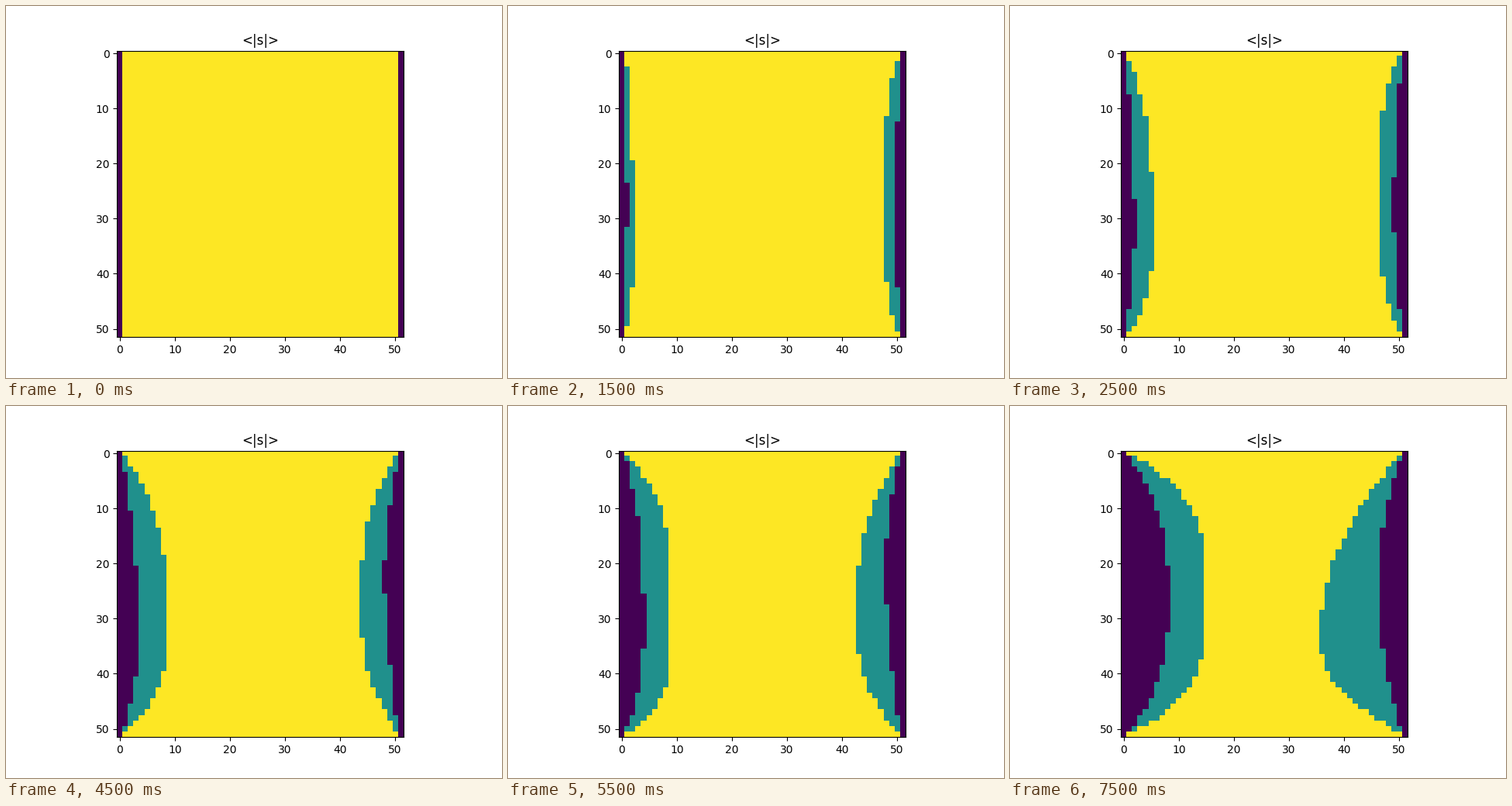
A matplotlib script for the animation above (8000 ms loop, 640x480 px).

```python
import matplotlib.pyplot as plt
import numpy as np
from matplotlib.animation import FuncAnimation

SIZE = 52
LAST = SIZE - 1
DARK, MIXED, BRIGHT = 0, 1, 2
rows = np.arange(SIZE)
cols = np.arange(SIZE)


def depth(peak, reach, fullness):
    """Whole cells covered from a wall: an arch pinned at both corners."""
    t = np.where(rows < peak, rows / peak, (LAST - rows) / (LAST - peak))
    return 1 + np.round(reach * (1 - (1 - t) ** fullness))


def fronts(left_dark, left_mixed, right_dark, right_mixed):
    """One (peak row, reach, fullness) arch per front."""
    return np.array([left_dark, left_mixed, right_dark, right_mixed])


def between(a, b):
    return (a + b) / 2


def grid(arches):
    depths = np.array([depth(*arch) for arch in arches])
    left_dark, left_mixed, right_dark, right_mixed = depths[:, :, None]
    from_right = LAST - cols
    cells = np.full((SIZE, SIZE), BRIGHT)
    cells[(cols < left_mixed) | (from_right < right_mixed)] = MIXED
    cells[(cols < left_dark) | (from_right < right_dark)] = DARK
    return cells


thin = fronts((28, 0.515, 2), (36, 1.54, 4.6), (30, 0.77, 2), (28, 2.72, 4.7))
bulge = fronts((36, 2.7, 1), (31, 7.8, 1.8), (25, 2.45, 1.3), (23, 5.55, 2.7))
wide = fronts((32, 3.55, 2.6), (31, 8.5, 3.8), (20, 2.8, 1.6), (30, 7.9, 2.5))
tall = fronts((30, 3.1, 2.8), (23, 7.9, 4.2), (29, 4.7, 1.6), (22, 15, 1.45))
late = fronts((27, 7.7, 2.6), (27, 14.2, 3.8), (24, 4.2, 2.1), (34, 14.8, 2.1))
flat = thin * [1, 0, 1]

steps = [flat, between(flat, thin), thin, between(thin, bulge), bulge,
         between(bulge, wide), wide, tall, late]
grids = [grid(arches) for arches in steps]

fig, ax = plt.subplots(figsize=(6.4, 4.8), dpi=100)
image = ax.imshow(grids[0], cmap="viridis", vmin=DARK, vmax=BRIGHT,
                  interpolation="nearest")
ax.set_title("<|s|>", pad=5.3)


def update(frame):
    # The first and last steps last half as long as the others.
    image.set_data(grids[(frame + 1) // 2])
    return [image]


anim = FuncAnimation(fig, update, frames=16, interval=500, repeat=True)
plt.show()
```
